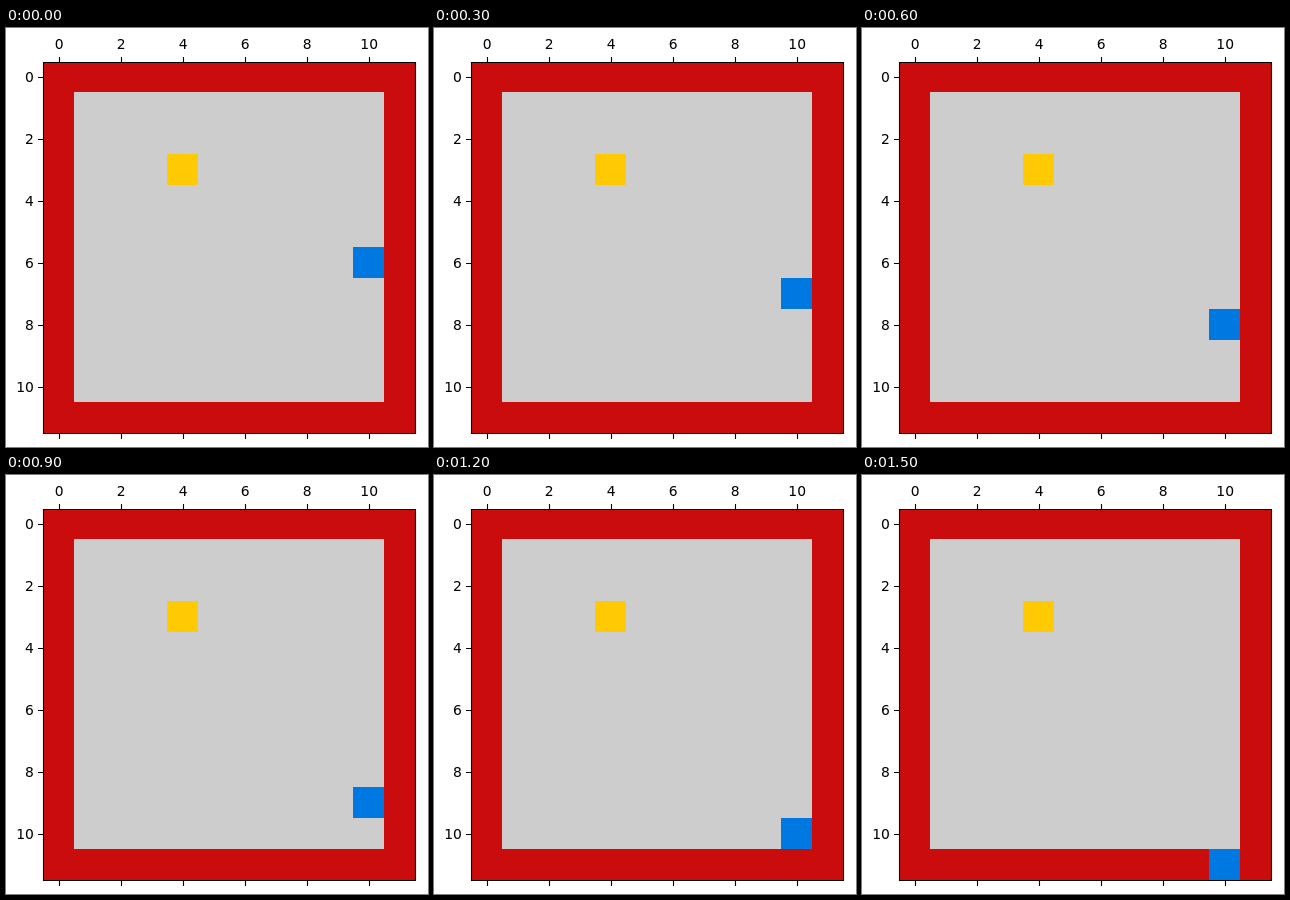
An HTML page for the animation above (1800 ms loop, 422x419 px).

```html
<!DOCTYPE html>
<html lang="en">
<head>
<meta charset="utf-8">
<title>Grid walk</title>
<style>
  html, body { margin: 0; width: 100%; height: 100%; overflow: hidden; background: #fff; }
  svg { display: block; }
  text { font: 13.89px "DejaVu Sans", sans-serif; }
</style>
</head>
<body>
<svg id="plot" width="422" height="419" viewBox="0 0 422 419"></svg>
<script>
const CELL = 31, LEFT = 37, TOP = 33;
const STEP_MS = 300, STEPS = 6, START_ROW = 6;
const plot = document.getElementById('plot');

function add(tag, attrs, text) {
  const node = document.createElementNS('http://www.w3.org/2000/svg', tag);
  for (const key in attrs) node.setAttribute(key, attrs[key]);
  if (text !== undefined) node.textContent = text;
  return plot.appendChild(node);
}

const rowY = row => TOP + row * CELL;

function addCells(col, row, count, fill) {
  const size = count * CELL;
  return add('rect', { x: LEFT + col * CELL, y: rowY(row), width: size, height: size, fill });
}

const addLine = d => add('path', { d, fill: 'none', stroke: '#000', 'stroke-width': 1.11 });

add('rect', { x: 37, y: 34, width: 373, height: 372, fill: '#cb0c0d' });
addCells(1, 1, 10, '#cdcdcd');
addCells(4, 3, 1, '#ffca04');
const walker = addCells(10, START_ROW, 1, '#0078e1');

addLine('M37.5 34.5H409.5V405.5H37.5Z');
for (let value = 0; value <= 10; value += 2) {
  const x = 53.5 + value * CELL, y = 49.5 + value * CELL;
  addLine(`M${x} 34V29M${x} 406V411M37 ${y}H32`);
  add('text', { x: x - 0.3, y: 21, 'text-anchor': 'middle' }, value);
  add('text', { x: 27.8, y: y + 4.5, 'text-anchor': 'end' }, value);
}

function render(ms) {
  const step = Math.floor(ms / STEP_MS) % STEPS;
  walker.setAttribute('y', rowY(START_ROW + step));
}

let start;
function tick(now) {
  start ??= now;
  render(now - start);
  requestAnimationFrame(tick);
}
requestAnimationFrame(tick);
</script>
</body>
</html>
```
